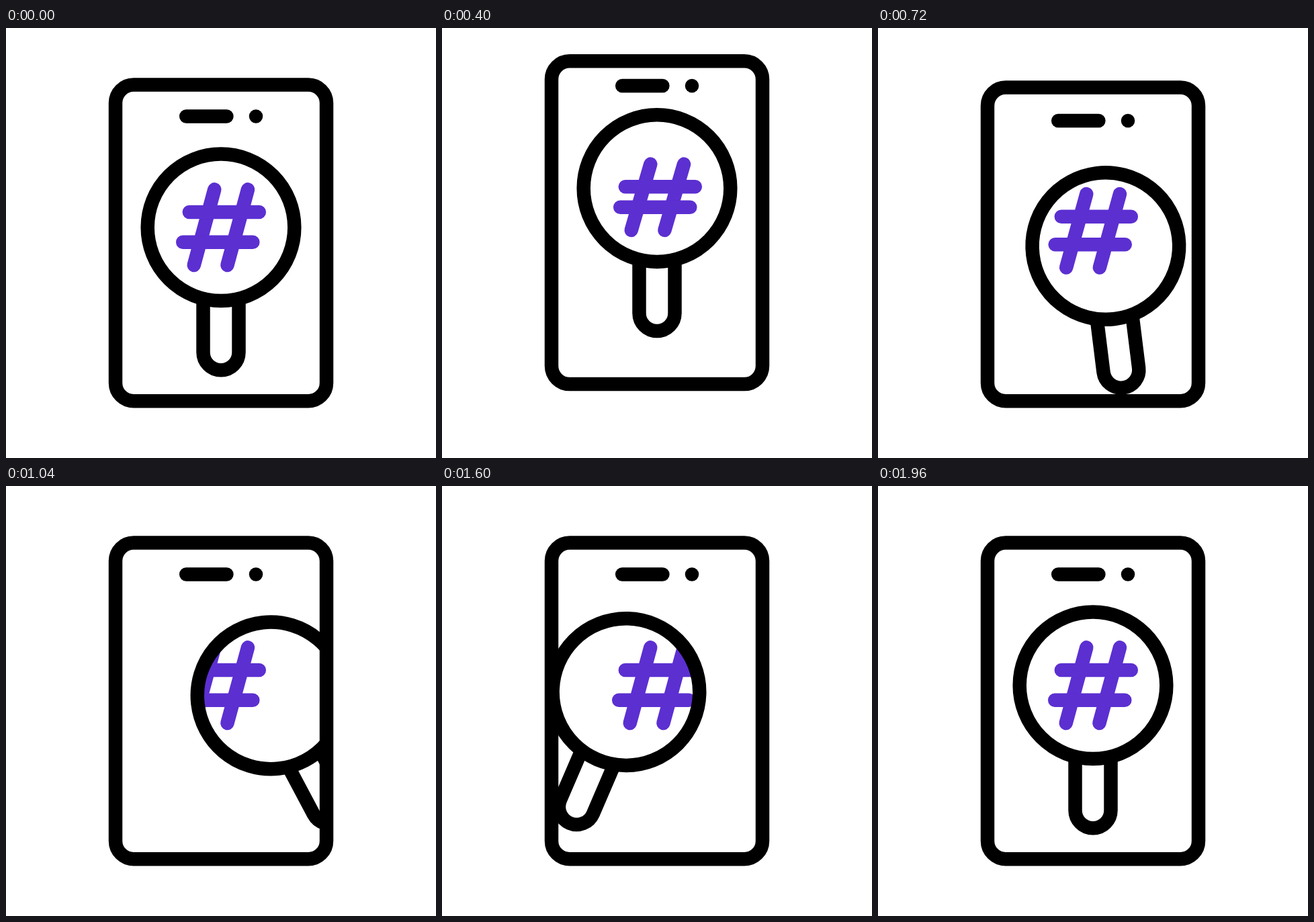
These frames come from a looping animation (640x640 px, 2 s). An HTML page with a canvas:

```html
<!DOCTYPE html>
<html lang="en">
<head>
<meta charset="utf-8">
<title>Hashtag search</title>
<style>
html, body { margin: 0; width: 100%; height: 100%; overflow: hidden; background: #fff; }
canvas { display: block; width: 100vw; height: 100vh; object-fit: contain; }
</style>
</head>
<body>
<canvas width="640" height="640"></canvas>
<script>
const ctx = document.querySelector('canvas').getContext('2d');
const LOOP = 2000, STEP = 40, STROKE = 20.5;
const INK = '#000', ACCENT = '#5c2fd1';

const smooth = s => s * s * (3 - 2 * s);

// Eases from each value to the next, reaching every value at its time.
function glide(t, times, values) {
  let v = values[0];
  for (let i = 1; i < times.length; i++) {
    const s = (t - times[i - 1]) / (times[i] - times[i - 1]);
    v += (values[i] - values[i - 1]) * smooth(Math.min(1, Math.max(0, s)));
  }
  return v;
}

// Crouch, leap, land and settle; every part shares the same timing.
const jump = (t, squash, peak) => glide(t, [120, 240, 440, 680, 820], [0, squash, peak, squash, 0]);

// Swing to the right, then to the left, then back to rest.
const swing = (t, right, left, leftTime) => glide(t, [600, 980, leftTime, 1940], [0, right, left, 0]);

function line(x1, y1, x2, y2) {
  ctx.beginPath();
  ctx.moveTo(x1, y1);
  ctx.lineTo(x2, y2);
  ctx.stroke();
}

function circle(x, y, r) {
  ctx.beginPath();
  ctx.arc(x, y, r, 0, 2 * Math.PI);
}

function drawHash(t) {
  const up = jump(t, 8.4, -43), low = jump(t, 4.4, -58.6), lean = (up - low) * 0.14;
  ctx.strokeStyle = ACCENT;
  for (const x of [0, 49.7]) line(310.3 + x, 240.3 + up, 279.7 + x + lean, 353 + low);
  line(272.8, 274 + up, 376.8, 274 + up);
  line(263.2 + lean, 318.8 + low, 367.3 + lean, 318.8 + low);
}

function drawMagnifier(x, y, tilt) {
  ctx.save();
  ctx.translate(x, y);
  ctx.rotate(tilt * Math.PI / 180);
  ctx.strokeStyle = INK;
  circle(0, 0, 109.3);
  ctx.stroke();
  ctx.beginPath();
  ctx.moveTo(-26.5, 107);
  ctx.arc(0, 186, 26.5, Math.PI, 0, true);
  ctx.lineTo(26.5, 107);
  ctx.lineCap = 'butt';
  ctx.stroke();
  ctx.restore();
}

function draw(t) {
  ctx.fillStyle = '#fff';
  ctx.fillRect(0, 0, 640, 640);
  ctx.lineWidth = STROKE;
  ctx.lineCap = 'round';

  const top = 84.6 + jump(t, 5, -40), bottom = 555.2 + jump(t, 0, -28);
  const body = new Path2D();
  body.roundRect(163, top, 314, bottom - top, 27);

  // The lens lands low and rises slowly while it swings.
  const x = 320 + swing(t, 80, -58, 1460);
  const y = 296.8 + glide(t, [120, 240, 440, 680, 1240, 1600, 1940], [0, 9, -66, 28, 9.8, 9.8, 0]);

  ctx.save();
  ctx.clip(body);
  ctx.save();
  circle(x, y, 109);
  ctx.clip();
  drawHash(t);
  ctx.restore();
  drawMagnifier(x, y, swing(t, -30, 26.5, 1505));
  ctx.restore();

  ctx.strokeStyle = ctx.fillStyle = INK;
  ctx.stroke(body);
  const notch = 131.6 + jump(t, 8, -51.8);
  line(268.2, notch, 328.4, notch);
  circle(372, notch, STROKE / 2);
  ctx.fill();
}

const start = performance.now();
function frame() {
  const t = (performance.now() - start) % LOOP;
  draw(Math.floor(t / STEP) * STEP);
  requestAnimationFrame(frame);
}
frame();
</script>
</body>
</html>
```
